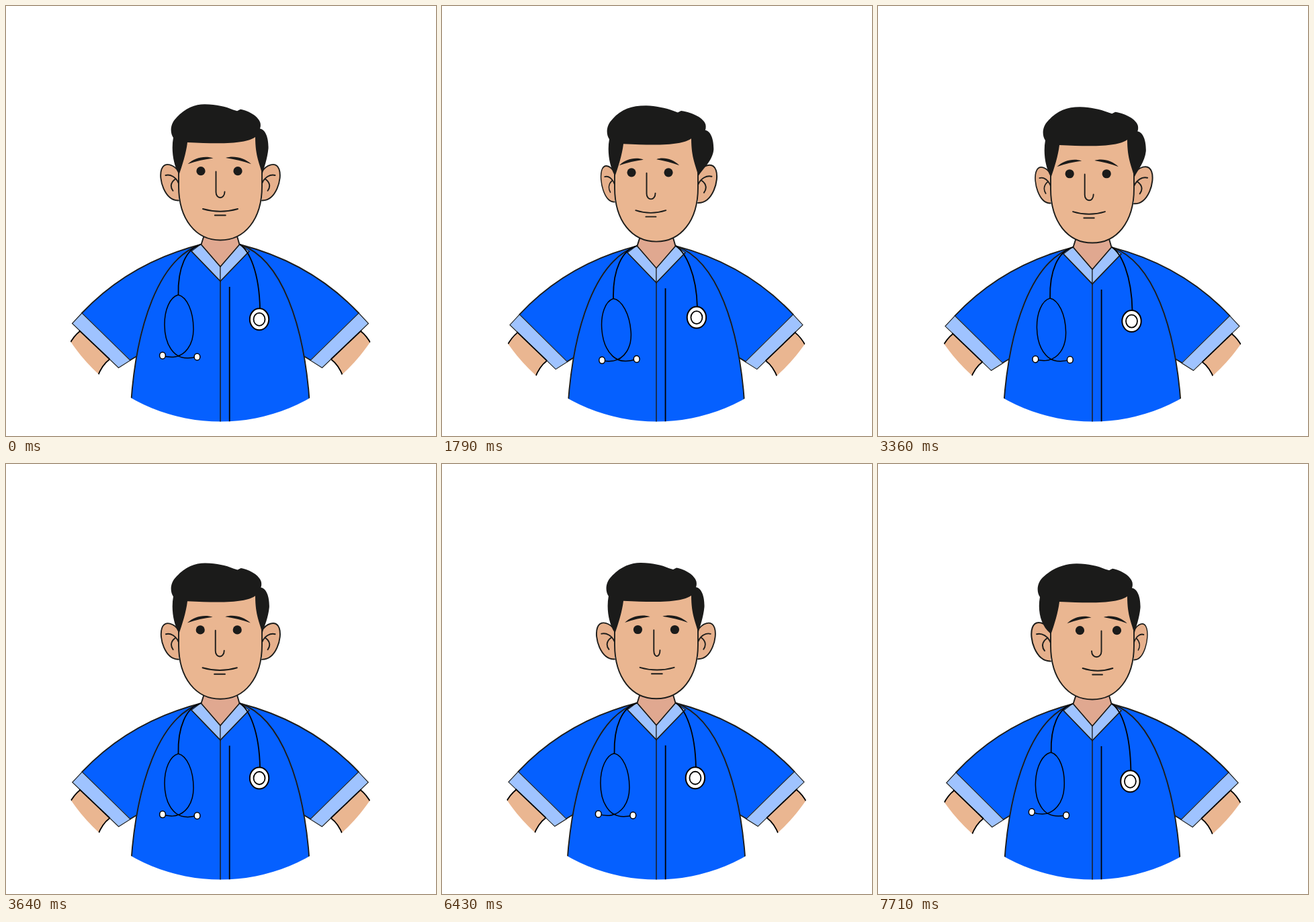
An HTML page that plays this animation: 640x640 px, repeating every 8 s.

```html
<!DOCTYPE html>
<html lang="en">
<head>
<meta charset="utf-8">
<title>Nurse</title>
<style>
  html, body { margin: 0; height: 100%; overflow: hidden; background: #fff; }
  svg { display: block; width: 100vw; height: 100vh; }
  .line { fill: none; stroke: #1d1d1b; stroke-width: 1.9; stroke-linecap: round; }
  .thin { stroke: #1d1d1b; stroke-width: 1.1; }
  .black { fill: none; stroke: #000; stroke-width: 1.8; }
  .blue { fill: #0560ff; }
  .pale { fill: #9fc3ff; }
  .skin { fill: #eab691; }
  .dark { fill: #1b1b1a; }
  .white { fill: #fff; stroke: #000; }
</style>
</head>
<body>
<svg viewBox="0 0 640 640">
  <defs>
    <clipPath id="disc"><circle cx="319.3" cy="350" r="268.6"/></clipPath>
    <g id="arm">
      <path class="skin" d="M110 484Q101 491 94 504L80 540L130 570L136 552Q143 534 154 526Z"/>
      <path class="black" d="M110 484Q101 491 94 504M154 526Q143 534 136 552"/>
      <path class="blue" d="M290 355Q184 382 113 457L185 527L230 500Z"/>
      <path class="line" d="M290 355Q184 382 113 457M185 527L200 518"/>
      <path class="pale thin" d="M113 457L98.5 472.5L167.5 538.5L185 527.5Z"/>
      <path class="black" d="M109 482.8L154.5 526"/>
    </g>
    <g id="earShape">
      <path class="line" style="fill:#e6b08c" d="M258 248C251 236 236 230.5 231.5 243C226.5 257 236 290 257 289.5"/>
      <path class="line" d="M237.5 252C245 250 253 255 256.5 263M251.5 258C244.5 263 244.5 270 248.5 275"/>
    </g>
  </defs>

  <g clip-path="url(#disc)">
    <g id="body">
      <use href="#arm"/>
      <use href="#arm" transform="translate(638 0) scale(-1 1)"/>
      <path class="line" style="fill:#0560ff" d="M290 355C227 376 194 476 186 592V640H452V592C444 476 411 376 348 355L319 388Z"/>
      <path class="line" d="M319 410V640" style="stroke-width:1.5"/>
      <path class="black" d="M332.7 418V640"/>
    </g>
  </g>

  <g id="upper">
    <path fill="#e0a890" d="M295 338L290 355L319 388L348 355L343 338Z"/>
    <path class="line" d="M295 341L290.5 355M343.5 341L347.5 355"/>
    <path class="pale thin" d="M290 354.5L276 365L319 410V388Z"/>
    <path class="pale thin" d="M348 354.5L362 365L319 410V388Z"/>
    <path class="line" d="M290 354.5L319 388L348 354.5M276 365L319 409.5L362 365" style="stroke-width:1.5"/>

    <path id="tubeL" class="black"/>
    <path id="tubeR" class="black"/>
    <g id="loop">
      <path class="black" style="stroke-width:1.5" d="M284.5 522C270 526 257 524 249 515C240 505 236 490 236 474C236 452 244 433 256.5 430C269 433 279 454 279 481C279 505 266 521 249 522.5Q241 523 233 520.5"/>
      <ellipse class="white" cx="233" cy="520.3" rx="4.4" ry="5" stroke-width="1.5"/>
      <ellipse class="white" cx="284.5" cy="522.2" rx="4.4" ry="5" stroke-width="1.5"/>
    </g>
    <g id="chest">
      <ellipse class="white" cx="377" cy="466.3" rx="14.2" ry="16" stroke-width="2"/>
      <ellipse class="white" cx="377" cy="466.3" rx="8.5" ry="9.5" stroke-width="1.8"/>
    </g>

    <use id="earL" href="#earShape"/>
    <use id="earR" href="#earShape"/>
    <path class="line" style="fill:#eab691" d="M257 190V268C257 318 283 348.5 319 348.5C355 348.5 381 318 381 268V190"/>
    <path id="hair" class="dark"/>
    <path id="browL" class="dark" d="M270.5 235.2C280 226 296 222 308.5 226.5C296 228 283 231 270.5 235.2Z"/>
    <path id="browR" class="dark" d="M365 235.2C355 226 339 222 327 226C340 228 353 231 365 235.2Z"/>
    <ellipse id="eyeL" class="dark" cy="245.7" rx="6.6"/>
    <ellipse id="eyeR" class="dark" cy="245.7" rx="6.6"/>
    <path id="nose" class="line"/>
    <path id="mouth" class="line"/>
    <path id="chin" class="line"/>
  </g>
</svg>
<script>
const LOOP = 8000, STEP = 1000 / 14;
const $ = id => document.getElementById(id);
const set = (id, attrs) => {
  for (const k in attrs) $(id).setAttribute(k, attrs[k]);
};

const smooth = p => p * p * (3 - 2 * p);
const out = p => 1 - (1 - p) * (1 - p);
const lin = p => p;

// Each key: time, value, easing into it
const turnKeys = [[0, 0], [1071, 0], [1900, -1, smooth], [3000, -1], [3790, 0, smooth],
  [6357, 0], [6429, .14, lin], [6930, 1, out]];
const bobKeys = [[0, 0], [1071, 0], [1460, 3.7, smooth], [1860, 2, smooth], [3000, 2],
  [3390, 4.1, smooth], [3790, 0, smooth], [6357, 0], [6600, 3.8, smooth], [6930, 2, smooth]];
const swingKeys = [[0, 0], [1071, 0], [1860, 1, smooth], [3000, 1], [3720, 0, out],
  [6357, 0], [6930, -.8, smooth]];
const blinks = [2071, 4500, 7571];

function at(keys, t) {
  const i = keys.findIndex(k => k[0] > t);
  if (i < 0) return keys[keys.length - 1][1];
  const [t0, a] = keys[i - 1], [t1, b, ease = lin] = keys[i];
  return a + (b - a) * ease((t - t0) / (t1 - t0));
}

function openness(t) {
  const near = Math.min(...blinks.map(b => Math.abs(t - b)));
  return Math.max(.1, Math.min(1, near / 138));
}

function draw(t) {
  const turn = at(turnKeys, t), bob = at(bobKeys, t), swing = at(swingKeys, t);
  const left = Math.max(0, -turn), right = Math.max(0, turn);
  const side = (l, r) => left * l + right * r;

  const squeeze = 1 - side(.012, .015);
  set('body', { transform: `translate(319 ${bob}) scale(${squeeze} 1) translate(-319 0)` });
  set('upper', { transform: `translate(0 ${bob})` });

  // Stethoscope
  const lx = -1.5 * swing, ly = 3.5 * swing, cx = 2 * swing, cy = -5 * swing;
  set('tubeL', { d: `M290 355C268 361 ${255.5 + lx} 390 ${256.5 + lx} ${430 + ly}` });
  set('loop', { transform: `translate(${lx} ${ly}) rotate(${-4.3 * swing} 256.5 430)` });
  set('tubeR', { d: `M348 355C362 364 ${377 + cx} 396 ${378 + cx} ${451 + cy}` });
  set('chest', { transform: `translate(${cx} ${cy})` });

  // The far ear narrows, the near one grows
  const ear = k => `translate(257 262) scale(${k} ${Math.max(1, k)}) translate(-257 -262)`;
  set('earL', { transform: ear(1 + side(-.25, .07)) });
  set('earR', { transform: 'translate(638 0) scale(-1 1) ' + ear(1 + side(.05, -.255)) });

  // Hair swells on the far side
  const L = 8 * right, R = 14.5 * left;
  set('hair', { d: `M257.5 251C${251 - L} 240 ${245 - L} 218 ${249 - L} 196
    C${244 - L} 189 ${244 - L} 176 ${253 - L} 167C${266 - L * .7} 152 ${282 - L * .3} 146 ${296 + R * .6} 146.2
    C${314 + R * .3} 147 ${326 + R * .4} 149 ${338 + R * .6} 154.5L${344 + R * .5} 156.3L${349 + R * .5} 153.8
    C${363 + R * .8} 156.5 ${376 + R} 165 ${378.5 + R} 174Q${379.5 + R} 179 ${378 + R} 182.5
    C${387 + R} 184 ${391 + R} 198 ${390.5 + R} 212C${389 + R} 228 ${384 + R * .3} 240 381.5 251
    C378 235 371 225 371 195C358 204 330 206 270 203C268 220 262 238 257.5 251Z` });

  // Face
  const eye = side(-8.4, 10.5), ry = 6.6 * openness(t);
  set('eyeL', { cx: 290 + eye, ry });
  set('eyeR', { cx: 345 + eye, ry });
  const brow = (x, dx, k) => `translate(${x + dx} 0) scale(${k} 1) translate(${-x} 0)`;
  set('browL', { transform: brow(289.5, side(-8.2, 10), 1 - side(.05, .05)) });
  set('browR', { transform: brow(346, side(-10.3, 7.3), 1 - side(.11, .08)) });

  const a = 312.5 + side(-8.4, 20), b = 325.5 + side(-8.4, -7.5);
  set('nose', { d: `M${a} 246.5V277C${a} 288 ${b} 288 ${b} 276.5` });
  const m = 319 + side(-8.7, 8), w = 26 - side(3.7, 3.6);
  set('mouth', { d: `M${m - w} 302Q${m} 309.5 ${m + w} 302` });
  const c = 318.8 + side(-8.3, 7.8), h = 8 - side(.5, .6);
  set('chin', { d: `M${c - h} 311.5H${c + h}` });
}

const start = performance.now();
function frame() {
  const t = (performance.now() - start) % LOOP;
  draw(Math.floor((t + 4) / STEP) * STEP);
  requestAnimationFrame(frame);
}
frame();
</script>
</body>
</html>
```
